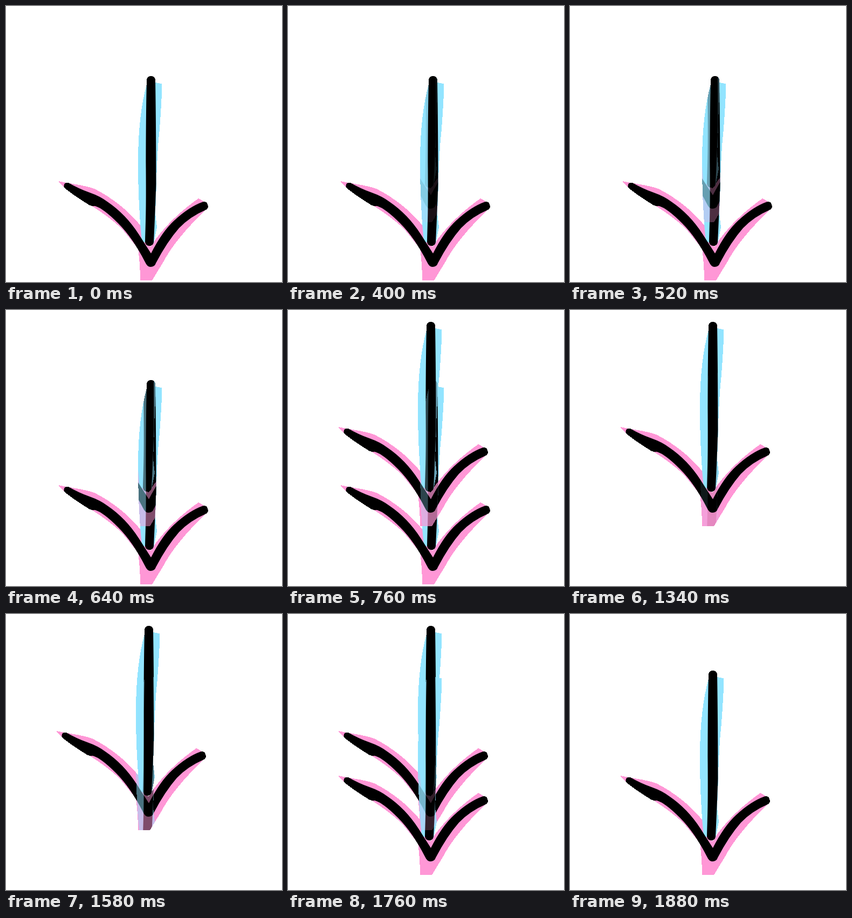
Animation, 512 px wide and 512 px high, one loop 2.08 s. Source, as an HTML page with a canvas:

```html
<!DOCTYPE html>
<html lang="en">
<head>
<meta charset="utf-8">
<title>Down arrow</title>
<style>
  html, body { margin: 0; width: 100%; height: 100%; overflow: hidden; background: #fff; }
  canvas { display: block; width: 100vw; height: 100vh; }
</style>
</head>
<body>
<canvas id="stage" width="512" height="512"></canvas>
<script>
const SIZE = 512, LOOP = 2080, STEP = 60, STEPS = 9;

const glow = new Path2D('M97 325L113 328Q150 334 164 339Q215 365 251 409L268 447L278 432Q310 390 357 357L366 362L374 375Q315 430 290 478Q280 494 271 509L249 509Q249 480 245 450L215 413Q190 390 155 368L108 336Z');
const side = new Path2D('M262 142L278 142L289.5 144.5Q288 200 282 260Q279 310 279 330L277 385L280 410L274 440L252 438Q245 370 245 290Q245 200 262 142Z');
const shaft = new Path2D('M261 137Q261.5 130 269 130Q276 130 277 136C278 200 278.5 270 278.5 330C277 370 276 400 274 438Q273 445 266 445Q259 445 258 438C259.5 390 260 370 259.5 300C259.5 240 260 180 261 137Z');
const head = new Path2D('M107.5 333Q108 327 116 328Q135 339 155 346Q175 353 188 363Q222 386 246 423L269 459Q290 418 312 398Q340 372 366 363Q373 363 374 368Q377 375 370 378.5Q341 391 321 412Q299 437 278 477Q276 484 268 484Q262 484 258 475Q235 430 208 403Q180 375 165 371Q157 372 151 367Q128 353 109 338Q107 336 107.5 333Z');

// Arrow sprite with a hard outer edge
function makeArrow() {
  const c = document.createElement('canvas');
  c.width = c.height = SIZE;
  const g = c.getContext('2d');
  const layers = [[glow, '#ff97d6'], [side, '#92e4ff'], [shaft, '#000'], [head, '#000']];
  for (const [path, color] of layers) {
    g.fillStyle = color;
    g.fill(path);
  }
  const img = g.getImageData(0, 0, SIZE, SIZE);
  for (let i = 3; i < img.data.length; i += 4) img.data[i] = img.data[i] < 128 ? 0 : 255;
  g.putImageData(img, 0, 0);
  return c;
}

const arrow = makeArrow();
const low = { x: 0, y: 0 };
const high = { x: -4, y: -108 };
const mid = { x: -4, y: -25 };

const ctx = document.getElementById('stage').getContext('2d');

function put(pos, mode = 'source-over', alpha = 1) {
  ctx.globalCompositeOperation = mode;
  ctx.globalAlpha = alpha;
  ctx.drawImage(arrow, pos.x, pos.y);
}

// The new arrow dissolves over the old one; outside it, it pops in past halfway
function dissolve(from, to, elapsed) {
  const step = Math.floor(elapsed / STEP) + 1;
  const mix = step / (STEPS + 1);
  put(from);
  put(to, 'source-atop', mix);
  if (mix > 0.5) put(to, 'destination-over');
}

function draw(ms) {
  const t = ms % LOOP;
  ctx.clearRect(0, 0, SIZE, SIZE);
  if (t < 400) put(low);
  else if (t < 940) dissolve(low, high, t - 400);
  else if (t < 1340) put(high);
  else if (t < 1880) dissolve(high, mid, t - 1340);
  else put(mid);
}

const start = performance.now();
function tick() {
  draw(performance.now() - start);
  requestAnimationFrame(tick);
}
tick();
</script>
</body>
</html>
```
